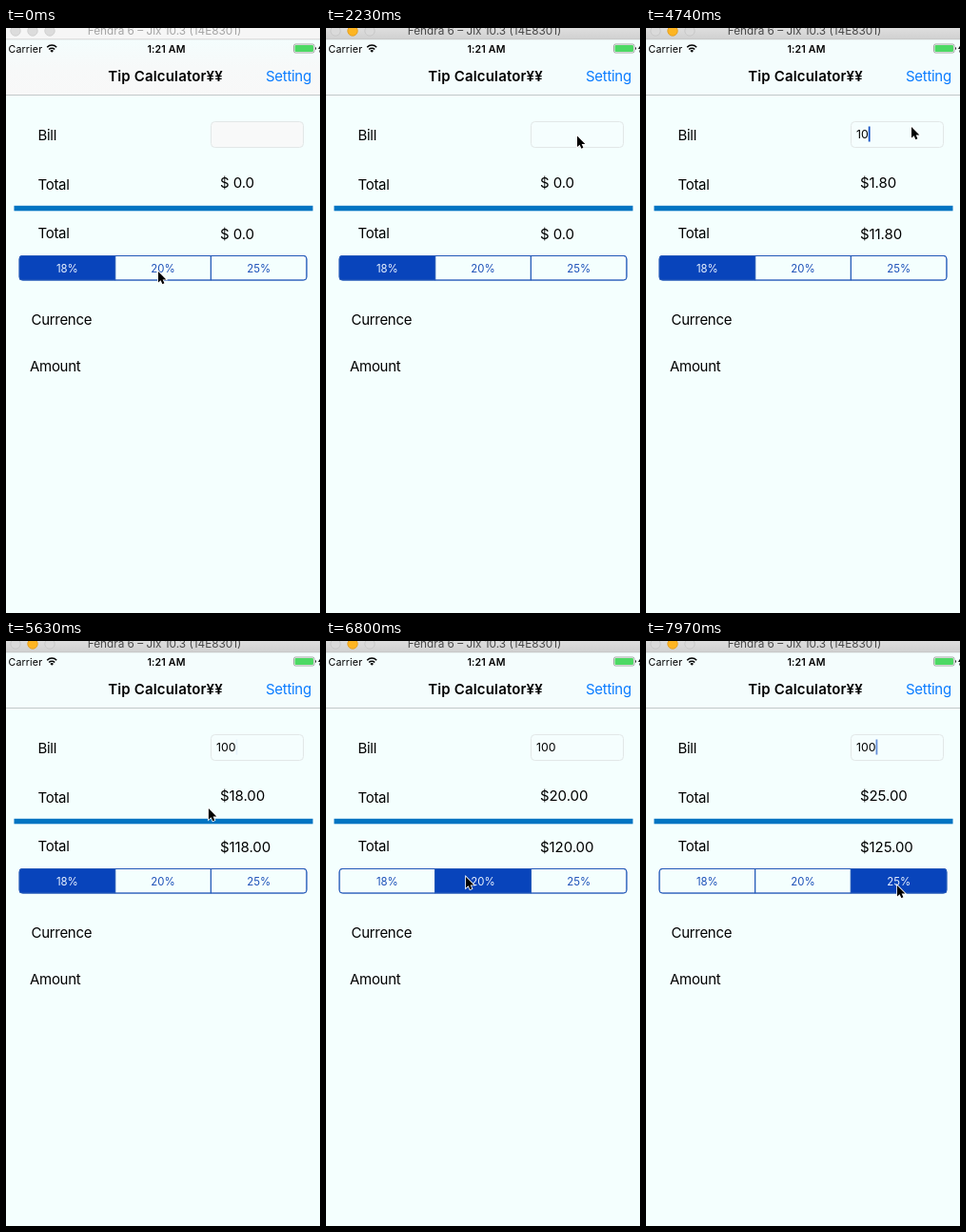
An HTML page for the animation above (8 s loop, 330 px wide and 615 px high).

```html
<!DOCTYPE html>
<html lang="en">
<head>
<meta charset="utf-8">
<title>Tip calculator</title>
<style>
  html, body { margin: 0; width: 330px; height: 615px; overflow: hidden; background: #f4fffe; }
  svg { display: block; }
  text { font: 15px Inter, "Open Sans", sans-serif; letter-spacing: -.02em; fill: #000; }
  .small { font-size: 10.6px; letter-spacing: .015em; }
  .bold { font-weight: 600; }
  .mid { text-anchor: middle; }
  .title { letter-spacing: .01em; }
  .money { letter-spacing: -.005em; }
  .link { fill: #0a7cff; }
  .input { font-size: 12.3px; letter-spacing: 0; }
  .seg text { font-size: 11.4px; letter-spacing: 0; fill: #1c50b8; }
  .seg rect { fill: transparent; stroke: #2358b8; }
  .seg.pressed rect { fill: #d2e2f3; }
  .seg.on rect { fill: #0844bb; }
  .seg.on text { fill: #e9f2ff; }
  .bar { fill: #f6f6f6; }
  .caption { font-size: 11.8px; letter-spacing: 0; fill: #a5a5a5; }
  .light { fill: #dcdcdc; stroke: #d2d2d2; }
  .nav { fill: url(#idle); }
  .field { fill: #f8f9f9; stroke: #e2e7e7; }
  .active .bar { fill: url(#chrome); }
  .active .caption { fill: #484848; }
  .active .light { fill: #dadada; stroke: #c9c9c9; }
  .active .amber { fill: #fdb522; stroke: #e6a226; }
  .active .nav { fill: #f4fdfd; }
  .active .field { fill: #f5fefe; }
</style>
</head>
<body>
<svg id="stage" width="330" height="615" viewBox="0 0 330 615">
  <defs>
    <linearGradient id="idle" x2="0" y2="1">
      <stop stop-color="#f4fdfd"/><stop offset=".5" stop-color="#f7f9f9"/><stop offset="1" stop-color="#f8f8f8"/>
    </linearGradient>
    <linearGradient id="chrome" x2="0" y2="1">
      <stop stop-color="#dedede"/><stop offset="1" stop-color="#d0d0d0"/>
    </linearGradient>
    <clipPath id="round"><rect x="13.5" y="239" width="303" height="26.6" rx="4"/></clipPath>
  </defs>
  <rect width="330" height="615" fill="#f4fffe"/>

  <!-- Window title bar -->
  <rect class="bar" width="330" height="12"/>
  <path d="M0 12H330" stroke="#bcbcbc" stroke-width=".8"/>
  <circle class="light" cx="10" cy="3" r="5.2"/>
  <circle class="light amber" cx="28" cy="3" r="5.2"/>
  <circle class="light" cx="46" cy="3" r="5.2"/>
  <text class="caption mid" x="166.5" y="7">Fendra 6 – Jix 10.3 (14E8301)</text>

  <!-- Status and navigation -->
  <rect class="nav" y="12.5" width="330" height="58"/>
  <path d="M0 70.5H330" stroke="#c3c8c9"/>
  <text class="small" x="2.5" y="25.5">Carrier</text>
  <g fill="none" stroke="#000" stroke-width="1.5">
    <path d="M43.2 20.2a7 7 0 0 1 10 0M45.2 22.4a4.2 4.2 0 0 1 6 0"/>
    <path d="M48.2 25.8l-1.8-1.9a2.6 2.6 0 0 1 3.6 0z" fill="#000" stroke="none"/>
  </g>
  <text class="small bold mid" x="168.5" y="25.5">1:21 AM</text>
  <rect x="302.5" y="17" width="21.5" height="9" rx="1.8" fill="#fff" stroke="#6a6a6a" stroke-width=".6"/>
  <rect x="303.5" y="18" width="19.5" height="7" rx="1" fill="#4cd964"/>
  <path d="M325 20v3a1.6 1.6 0 0 0 0-3" fill="#333"/>
  <path d="M331 17l-3 5h2l-1 4 2-2z"/>
  <text class="title bold mid" x="167.5" y="56">Tip Calculator¥¥</text>
  <text class="link" x="273" y="56">Setting</text>

  <!-- Form -->
  <text x="33.5" y="117.5">Bill</text>
  <rect class="field" x="215.5" y="98.5" width="97" height="27" rx="4"/>
  <text class="input" id="bill" x="221" y="116"></text>
  <rect id="caret" y="103.5" width="1.8" height="16" fill="#1450c4"/>
  <text x="33.5" y="170">Total</text>
  <text class="money" id="tip" x="225" y="168"></text>
  <rect x="8.5" y="186.8" width="314" height="5.5" fill="#0074c2"/>
  <text x="33.5" y="220.8">Total</text>
  <text class="money" id="total" x="225" y="221.5"></text>
  <g id="segments" clip-path="url(#round)"></g>
  <rect x="14" y="239.5" width="302" height="25.6" rx="3.5" fill="none" stroke="#2358b8"/>
  <text x="26.5" y="311.5">Currence</text>
  <text x="25" y="361">Amount</text>

  <g id="cursor">
    <path transform="scale(.88)" d="M0 0V13.2L3 10.4 5 15 7.3 14 5.3 9.6H9.5Z" stroke="#fff" stroke-width="1.8" paint-order="stroke"/>
  </g>
</svg>
<script>
  const LOOP = 8000;
  const TICK = 147.2, PHASE = 16.8; // screen refresh
  const ACTIVATE = 2070, FOCUS = 2515;
  const rates = [18, 20, 25];
  const keys = [3100, 4300, 5020];
  const taps = [{ at: 6500, seg: 1 }, { at: 7520, seg: 2 }];
  const HOLD = 140;
  const home = { x: 160, y: 256 };
  const moves = [
    { from: 750, to: 1340, x: 285, y: 100.5 },
    { from: 1500, to: 1780, x: 264, y: 113.5 },
    { from: 3400, to: 3690, x: 279, y: 104 },
    { from: 5170, to: 6050, x: 147, y: 248 },
    { from: 6800, to: 7370, x: 264, y: 257 },
  ];

  const $ = id => document.getElementById(id);
  const clamp = v => Math.max(0, Math.min(1, v));
  const ease = p => p * p * (3 - 2 * p);
  const money = v => '$' + v.toFixed(2);

  const width = 302 / rates.length;
  $('segments').innerHTML = rates.map((rate, i) => `<g class="seg" transform="translate(${14 + i * width} 239.5)">
    <rect width="${width}" height="25.6"/><text class="mid" x="${width / 2}" y="17.5">${rate}%</text></g>`).join('');
  const segs = [...document.querySelectorAll('.seg')];

  function pointer(t) {
    return moves.reduce((p, m) => {
      const k = ease(clamp((t - m.from) / (m.to - m.from)));
      return { x: p.x + (m.x - p.x) * k, y: p.y + (m.y - p.y) * k };
    }, home);
  }

  function blink(age) {
    const p = age % 1000 / 1000;
    return p < .85 ? clamp((.6 - p) / .15) : clamp((p - .85) / .15);
  }

  function draw(time) {
    const t = Math.max(0, Math.floor((time - PHASE) / TICK) * TICK + PHASE);
    const { x, y } = pointer(t);
    const typed = keys.filter(k => k <= t);
    const bill = '100'.slice(0, typed.length);
    const chosen = taps.findLast(p => p.at + HOLD <= t)?.seg ?? 0;
    const held = taps.find(p => p.at <= t && t < p.at + HOLD)?.seg;
    const tip = bill * rates[chosen] / 100;

    $('stage').classList.toggle('active', t >= ACTIVATE);
    $('cursor').setAttribute('transform', `translate(${x} ${y})`);
    $('bill').textContent = bill;
    $('tip').textContent = bill ? money(tip) : '$ 0.0';
    $('total').textContent = bill ? money(+bill + tip) : '$ 0.0';
    $('caret').setAttribute('x', 221 + (bill ? $('bill').getComputedTextLength() : 0));
    $('caret').setAttribute('opacity', t < FOCUS ? 0 : blink(t - (typed.at(-1) ?? FOCUS)));
    segs.forEach((s, i) => {
      s.classList.toggle('on', i === chosen);
      s.classList.toggle('pressed', i === held);
    });
  }

  const start = performance.now();
  function loop() {
    draw((performance.now() - start) % LOOP);
    requestAnimationFrame(loop);
  }
  loop();
</script>
</body>
</html>
```
